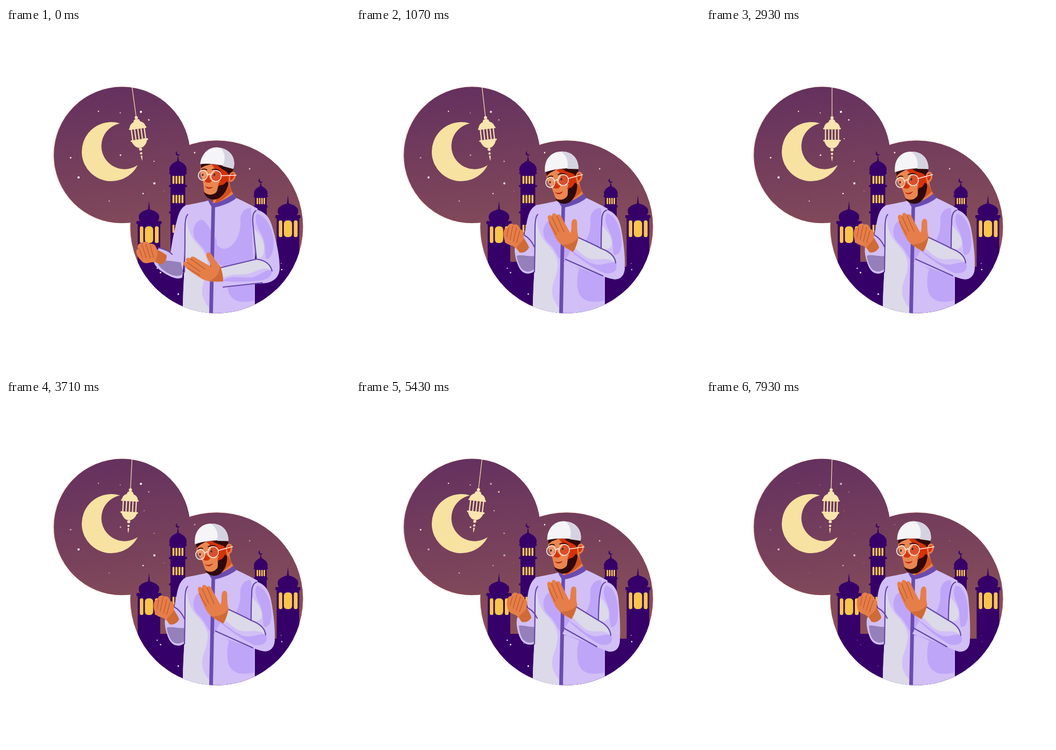
Recreate the animation shown at these times as an HTML page. Size 640x640 px, loop 8000 ms.

```html
<!DOCTYPE html>
<html lang="en">
<head>
<meta charset="utf-8">
<title>Night prayer</title>
<style>
html, body { margin: 0; width: 100%; height: 100%; overflow: hidden; background: #fff; }
svg { display: block; width: 100vw; height: 100vh; }
.ink { fill: #360069; }
.glow { fill: #f8c64b; }
.lav { fill: #d1bff6; }
.deep { fill: #bfa5f8; }
.pale { fill: #dcd9e8; }
.seam { fill: none; stroke: #6546aa; stroke-width: 2.2; stroke-linecap: round; }
.skin { fill: #e67e49; }
.tan { fill: #d06a37; }
.crease { fill: none; stroke: #bd5a2c; stroke-width: 1.3; stroke-linecap: round; }
.red { fill: #d4330a; }
.hair { fill: #2f0a0c; }
.brow { fill: none; stroke: #2f0a0c; stroke-width: 1.8; stroke-linecap: round; }
.cream { fill: #f9e6ae; }
</style>
</head>
<body>
<svg id="stage" viewBox="0 0 640 640"></svg>
<script>
const LOOP = 8000;
const svg = document.getElementById('stage');

const rect = (x, y, w, h, cls, r = 0) =>
  `<rect x="${x}" y="${y}" width="${w}" height="${h}" rx="${r}" class="${cls}"/>`;
const dot = (x, y, r, cls) => `<circle cx="${x}" cy="${y}" r="${r}" class="${cls}"/>`;
const path = (d, cls, extra = '') => `<path d="${d}" class="${cls}" ${extra}/>`;

// Onion dome with its base at y
const dome = (x, y, w, h) => path(
  `M${x - w * .42} ${y}C${x - w * .62} ${y - h * .5} ${x - w * .35} ${y - h * .85} ${x} ${y - h}` +
  `C${x + w * .35} ${y - h * .85} ${x + w * .62} ${y - h * .5} ${x + w * .42} ${y}Z`, 'ink');
const spire = (x, y, h) => path(`M${x - 2} ${y}L${x} ${y - h}L${x + 2} ${y}Z`, 'ink');
const moonlet = (x, y) => path(
  `M${x - 1} ${y - 4}A4 4 0 1 0 ${x + 3.6} ${y + 1}A3.4 3.4 0 0 1 ${x - 1} ${y - 4}Z`, 'ink');
const slits = (x, y, step, w, h) =>
  [0, 1, 2, 3].map(i => rect(x + i * step, y, w, h, 'glow', 1.3)).join('');
const ledge = (x, y, w, h = 4) => rect(x - w / 2, y, w, h, 'ink', 2);

// Wide tower with three arched windows
const hall = (x, y) =>
  spire(x, y - 20, 17) + rect(x - 19, y - 16, 38, 18, 'ink', 8) + dome(x, y - 2, 38, 20) +
  ledge(x, y, 47, 6) + rect(x - 21, y, 42, 200, 'ink') +
  rect(x - 17, y + 10, 6.5, 31, 'glow', 3) + rect(x - 7.6, y + 10, 15.4, 31, 'glow', 6) +
  rect(x + 11, y + 10, 7, 31, 'glow', 3);

const towers =
  moonlet(320, 233.5) + spire(320, 249, 13) + dome(320, 271, 33, 24) + ledge(320, 268, 33) +
  rect(306, 270, 27.5, 170, 'ink') + ledge(320, 292, 34) + ledge(320, 341, 34) +
  slits(309.7, 275, 5.6, 3.6, 15) + slits(309.7, 310.5, 5.6, 3.6, 15.5) + slits(309.7, 366, 5.6, 3.6, 15) +
  moonlet(474, 284) + spire(474, 296, 10) + dome(474, 314, 26, 20) + ledge(474, 311, 27) +
  rect(463, 312, 22, 140, 'ink') + ledge(474, 330, 26) + slits(466.3, 316, 4.3, 2.8, 12) +
  hall(266, 359) + hall(524.5, 348) +
  path('M225 435H400V444H570V540H225Z', 'ink');

// Keyed brightness: time, value pairs
const TWINKLE = [
  [0, 1, 250, 1, 800, .15, 1350, 1, 3250, 1, 4300, .08, 5200, 1, 6750, 1, 7930, .25, 8000, .25],
  [0, 1, 3250, 1, 4300, .05, 5200, 1, 6750, 1, 7930, .18, 8000, .18],
  [0, 1, 900, 1, 1800, 0, 2850, 1, 4700, 1, 5430, .5, 5950, 1, 6950, 1, 7930, .65, 8000, .65],
  [0, 1, 700, 1, 1900, .25, 2600, 1, 3500, 1, 4350, .25, 5200, 1, 6900, 1, 7930, .15, 8000, .15]
];
const STARS = [
  [[212.5, 158, 1], [265.7, 171, 1.4], [257, 206, 1], [213, 236.4, 1.5], [120.2, 241.2, 1.5]],
  [[172, 155, 1.2], [275.5, 248, 1.1], [192, 322, 1], [351, 232, 1.4], [453.3, 262, 1.2]],
  [[251, 156, 2], [135, 278, 2], [276, 289, 2], [255, 308, 1.3], [294, 303, .6]],
  [[281.4, 447, 1.2], [287.5, 455, 1.5], [320.5, 495, 1.6], [513, 449.5, 1.3], [512, 438, .8], [312, 453, .6]]
];
const stars = i => `<g id="twinkle${i}" fill="${i > 1 ? '#fff' : '#fdeacb'}">` +
  STARS[i].map(s => dot(...s, '')).join('') + '</g>';

const lantern = `<g id="lantern" class="cream">
  ${rect(233.9, 100, 1.2, 66, '')}${dot(234.5, 167.3, 3, '')}
  ${path('M228.5 175C228.5 171 231 170 234.5 170S240.5 171 240.5 175C246 177 249 181 249.5 186H219.5C220 181 223 177 228.5 175Z', '')}
  ${rect(218, 185.5, 33, 3, '', 1.5)}
  ${[0, 1, 2, 3, 4].map(i => rect(221.3 + i * 6.05, 188, 2.2, 21, '')).join('')}
  ${rect(218, 208, 33, 3, '', 1.5)}
  ${path('M220 210.5H249C247 217 243 222 238 223.5H231C226 222 222 217 220 210.5Z', '')}
  ${dot(234.5, 226.5, 2.9, '')}${dot(234.5, 234.3, 2.2, '')}${dot(234.5, 240, 1.6, '')}
  ${path('M233.2 241.5H235.8L234.5 248.5Z', '')}</g>`;

const torso =
  path('M376 321C362 325 346 327 334 330C329 345 334 380 332 452C330 480 329 500 328.5 540H463V430L468 336C455 329 442 322 428 316L400 330Z', 'lav') +
  path('M336 348C337 372 342 384 352 398C366 412 378 428 375 446C373 464 364 474 365 492C366 508 376 518 381 524V540H328.5C329 500 331 470 332 440V360Z', 'pale') +
  path('M349 384C347 368 356 356 366 357C378 366 384 384 392 394V440C378 436 372 414 362 404C354 396 350 392 349 384Z', 'deep') +
  path('M456 335C444 334 436 344 436 358C438 384 424 410 405 411C397 410 392 403 388 399V436L420 450L460 436Z', 'deep') +
  path('M418 440C410 458 410 482 415 494C424 512 444 511 462 507V440Z', 'deep') +
  path('M338 347C332 353 333 372 333 400L332 454', 'seam') +
  path('M382.3 332L389 331L384.8 540H377.8Z', '', 'fill="#6a4bb0"');

const neck =
  path('M388 304L414 276C416 292 418 302 424 310L404 326L384 330Z', 'skin') +
  path('M392 318L414 290L420 304C410 314 400 322 388 327Z', '', 'fill="#d4501c"') +
  path('M376 320.5C379 328 382 333 386 334.5C402 331 418 325 428 317L424 307.5C412 317 400 323 388 326C383 325 380 321 379 318Z', '', 'fill="#6a4bb0"');

const head = `<g id="head">
  ${path('M355 264C353 276 355 286 360 292C366 298 368 310 372 318C380 328 394 326 402 314L411 296V262Z', '', 'fill="#ea8650"')}
  ${path('M372 264L405 260L411 270V296L400 312C392 304 392 298 396 290C386 296 376 292 377 284C384 276 382 270 372 264Z', 'red')}
  ${path('M370 283C368 289 366 294 368 298C374 300 379 298 380 294C376 292 373 288 370 283Z', 'red')}
  ${path('M353 266L374 262C366 268 360 268 355 276Z', 'hair')}
  ${path('M384 263C396 259 406 259 414 261L412 276L407 274C403 268 394 270 384 263Z', 'hair')}
  ${path('M407 288L411.5 290C412 302 408 316 399 323C390 330 376 328 370 316C376 321 386 321 392 314C396 310 392 304 396 298C402 297 405 293 407 288Z', 'hair')}
  ${path('M370 305.5C375 308 380 307 385 303.5C383 309 375 312 370 305.5Z', '', 'fill="#b5200a"')}
  ${path('M357 278C360 275 363 275 366 276M376 273C381 270 386 270 391 273', 'brow')}
  ${path('M409 276C409 268 416 265 420 270C423 276 420 287 413 287C410 286 409 282 409 276Z', 'skin')}
  ${path('M411 277C411 271 416 269 418 273C419 279 416 284 413 284Z', 'red')}
  <ellipse cx="361" cy="287" rx="1.6" ry="2.2" class="hair"/><ellipse cx="382" cy="281.5" rx="1.7" ry="2.3" class="hair"/>
  <g id="lids"><circle cx="361" cy="286.5" r="3.5" fill="#ea8650"/><circle cx="382" cy="281.5" r="3.5" class="red"/>
  ${path('M358 287.5Q361 289 364 287M379 282.5Q382 284 385 282', 'brow', 'style="stroke-width:1"')}</g>
  <g fill="#fff" fill-opacity=".14" stroke="#fff4ea" stroke-width="1.5">
  <ellipse cx="361.5" cy="287.5" rx="8.5" ry="9.3"/><ellipse cx="385.5" cy="283" rx="9.8" ry="10.2"/>
  <path d="M370 285Q373 281 376 283M395 280L422 272.5" fill="none"/></g>
  ${path('M351.5 268.5C349 246 362 230 381 230C402 229 415 244 413.5 262.5C394 259 370 262 351.5 268.5Z', '', 'fill="#f5f4f6"')}
  ${path('M381 230C402 229 415 244 413.5 262.5L393 262C396 248 391 236 381 230Z', '', 'fill="#d6d3e1"')}
</g>`;

const leftHand = `<g id="leftHand">
  ${path('M276 392C273 382 275 370 282 371C283 363 291 362 294 366C299 363 304 368 306 374C312 376 314 382 312 389C316 396 320 402 322 408C318 416 310 419 304 417C300 411 296 406 288 404C280 402 277 398 276 392Z', 'skin')}
  ${path('M312 391C316 397 320 402 322 408C318 416 310 419 304 417L299 409C301 402 307 402 312 391Z', 'tan')}
  ${path('M284 372L281 388M292 368L287 393M299 371L293 397M305 377L299 399', 'crease')}</g>`;

const rightHand = `<g id="rightHand">
  ${path('M357 352C357 347 362 346 365 350C364 343 371 342 374 348C376 344 382 347 384 354L399 381C402 375 400 365 402 359C404 353 411 354 411.5 361C412 370 411 378 414 388C412 400 408 410 404 416C392 410 378 402 372 390C366 378 359 365 357 352Z', 'skin')}
  ${path('M414 388C412 400 408 410 404 416L382 402C396 404 408 398 414 388Z', 'tan')}
  ${path('M365 351L377 378M374 349L387 379M360 360L373 384', 'crease')}</g>`;

// Each morph holds three poses: hands low, hands raised, hands close
const MORPHS = {
  leftSleeve: ['lav',
    'M338 329C326 331 321 346 318 358C313 376 309 398 306 418L284 409L276 430C272 436 280 446 290 453C302 461 318 470 328 464L333 410L338 346Z',
    'M338 329C324 333 320 348 317 366C314 380 312 388 314 389L313 385L296 408C294 416 298 436 305 448C311 458 324 460 332 452L333 400L338 346Z',
    'M338 329C327 333 321 348 319 368C318 380 319 386 321 390L320 387L300 405C297 414 300 432 306 444C312 456 326 458 334 452L334 400L338 346Z'],
  leftShade: ['',
    'M281 434C292 430 308 434 325 436L330 456C322 466 306 460 295 452C288 447 282 440 281 434Z',
    'M299 424C306 420 322 426 333 424L332 448C324 456 312 454 307 446C302 438 300 430 299 424Z',
    'M303 420C308 418 322 423 334 422L334 448C326 454 314 452 309 443C305 436 304 428 303 420Z'],
  leftSeam: ['seam',
    'M283 409C295 410 303 415 309 421',
    'M313 385C322 390 328 398 332 407',
    'M320 387C329 392 334 399 337 406'],
  sleeve: ['lav',
    'M466 338C484 342 492 356 496 372C504 400 510 430 509 448C508 464 498 473 480 475C460 476 430 479 403 483L398 446C420 441 445 436 466 430C462 400 457 365 459 350Z',
    'M466 338C482 342 490 356 493 372C498 398 501 425 500 448C499 462 490 470 477 467C460 463 430 449 386 438L413 388C430 396 442 404 456 410C457 390 453 360 458 348Z',
    'M464 338C478 340 486 352 488 368C491 398 492 425 491 446C491 460 484 470 470 468C455 464 430 448 384 435L410 384C425 392 438 402 451 410C450 390 450 365 456 348Z'],
  armShade: ['deep',
    'M467 345C482 350 493 366 497 388C500 412 494 430 484 430C480 410 484 398 473 380C465 368 462 352 467 345Z',
    'M467 345C480 348 490 364 493 386C496 410 491 424 480 422C476 404 480 396 470 376C464 364 462 352 467 345Z',
    'M465 345C477 347 485 362 487 384C489 410 484 424 474 422C470 404 475 396 466 376C460 364 459 352 465 345Z'],
  armLight: ['pale',
    'M460 372C470 380 482 396 480 412C480 424 474 430 466 429Z',
    'M457 366C468 378 477 390 476 402C474 412 466 413 456 410Z',
    'M454 366C464 378 472 390 470 402C468 412 460 413 451 410Z'],
  cuffLight: ['pale',
    'M398 446L466 430C482 432 492 440 495 452C480 440 465 455 448 458C430 460 425 456 402 465Z',
    'M413 388L456 410C470 416 480 424 483 437C470 425 455 432 440 430C425 428 418 416 402 406Z',
    'M410 384L451 410C462 416 472 424 474 438C462 426 450 432 436 430C420 426 414 412 400 402Z'],
  cuffShade: ['deep',
    'M402 470C420 458 440 466 458 464C475 460 484 446 495 452C494 466 480 470 462 471C440 472 420 474 402 470Z',
    'M396 412C412 418 428 436 446 440C462 442 474 432 484 438C488 450 480 458 462 456C440 446 420 432 396 412Z',
    'M392 408C408 415 424 434 440 439C454 442 466 432 475 439C479 451 472 458 454 455C434 445 414 428 392 408Z'],
  armSeam: ['seam',
    'M465 340C458 344 458 356 460 370C462 395 464 412 466 429',
    'M466 339C458 342 457 352 457 364C456 380 456 396 456 410',
    'M464 339C456 342 455 354 453 366C451 385 451 398 451 410'],
  cuffSeam: ['seam',
    'M399 446C420 441 445 435 466 430C482 432 492 440 495 452',
    'M413 389C430 397 445 404 456 410C472 416 482 424 483 437',
    'M410 385C425 394 438 402 451 410C464 417 473 425 474 438'],
  hemSeam: ['seam', 'M404 482L477 474', 'M390 430L459 461', 'M384 423L448 459']
};
const TURNS = {
  head: ['translate(-3 -5) rotate(14 400 315)', 'translate(0 0) rotate(0 400 315)', 'translate(-2 -2.5) rotate(7 400 315)'],
  leftHand: ['translate(-20 19) rotate(-30 313 412)', 'translate(0 0) rotate(0 313 412)', 'translate(4 -4) rotate(4 313 412)'],
  rightHand: ['translate(-8 55) rotate(-31 409 402)', 'translate(0 0) rotate(0 409 402)', 'translate(-3 -8) rotate(2 409 402)']
};
const morphs = ids => ids.split(' ').map(id => path('', MORPHS[id][0], `id="${id}"`)).join('');

svg.innerHTML = `
<defs>
  <linearGradient id="sky" gradientUnits="userSpaceOnUse" x1="205" y1="105" x2="245" y2="440">
    <stop stop-color="#64315f"/><stop offset="1" stop-color="#8a5058"/></linearGradient>
  <clipPath id="low"><circle cx="392" cy="370" r="160.8"/></clipPath>
  <clipPath id="high"><circle cx="216" cy="236.3" r="127"/></clipPath>
</defs>
<g fill="#e59a86"><circle cx="215.3" cy="236.3" r="127"/><circle cx="391.6" cy="369.8" r="160.8"/></g>
<g fill="url(#sky)"><circle cx="216" cy="236.3" r="126.8"/><circle cx="392" cy="370" r="160.6"/></g>
<path d="M212 177.5A55 55 0 1 0 245 255A43 43 0 1 1 212 177.5Z" fill="#f7e2a1"/>
<g clip-path="url(#low)">${towers}</g>
${[0, 1, 2, 3].map(stars).join('')}
<g clip-path="url(#high)">${lantern}</g>
<g clip-path="url(#low)">
  ${morphs('leftSleeve leftShade')}${torso}${morphs('leftSeam')}${leftHand}${neck}${head}
  ${morphs('sleeve armShade armLight cuffShade cuffLight armSeam cuffSeam hemSeam')}${rightHand}
</g>`;

const el = {};
svg.querySelectorAll('[id]').forEach(n => el[n.id] = n);
el.leftShade.setAttribute('fill', '#9580bb');

const clamp = v => Math.min(1, Math.max(0, v));
const ease = v => (1 - Math.cos(Math.PI * clamp(v))) / 2;
const NUM = /-?\d+(\.\d+)?/g;

function mix(a, b, k) {
  const to = b.match(NUM);
  let i = 0;
  return a.replace(NUM, v => (+v + (to[i++] - v) * k).toFixed(2) + ' ');
}
const blend = ([a, b, c], p) => p < 1 ? mix(a, b, p) : mix(b, c, p - 1);

function keyed(keys, t) {
  let i = 0;
  while (i < keys.length - 4 && t > keys[i + 2]) i += 2;
  const k = clamp((t - keys[i]) / (keys[i + 2] - keys[i]));
  return keys[i + 1] + (keys[i + 3] - keys[i + 1]) * k;
}

function draw(t) {
  const pose = ease(t / 1140) + ease((t - 4100) / 1300);
  for (const id in MORPHS) el[id].setAttribute('d', blend(MORPHS[id].slice(1), pose));
  for (const id in TURNS) el[id].setAttribute('transform', blend(TURNS[id], pose));
  const swing = .55 + 7.3 * Math.cos(2 * Math.PI * t / 11400 + .035);
  el.lantern.setAttribute('transform', `rotate(${-swing} 234.5 110)`);
  TWINKLE.forEach((keys, i) => el['twinkle' + i].setAttribute('opacity', keyed(keys, t)));
  el.lids.setAttribute('opacity', t > 6380 && t < 6540 ? 1 : 0);
}

const start = performance.now();
function tick() {
  draw((performance.now() - start) % LOOP);
  requestAnimationFrame(tick);
}
tick();
</script>
</body>
</html>
```
